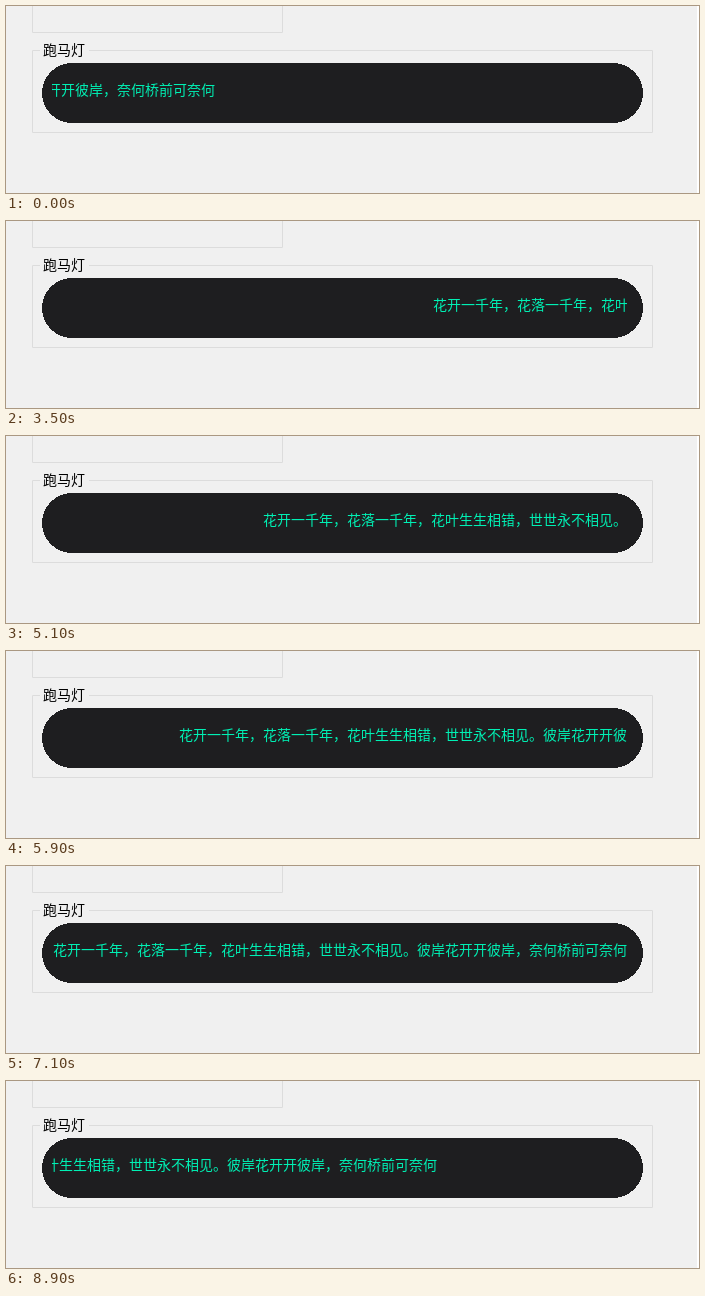
Animation of 693x187 px, one loop 9 s. Source, as an HTML page:

```html
<!DOCTYPE html>
<html lang="zh-CN">
<head>
<meta charset="utf-8">
<title>跑马灯</title>
<style>
  html, body { margin: 0; width: 100%; height: 100%; overflow: hidden; background: #f0f0f0; }
  svg { display: block; }
  text { font: 14px "Noto Sans CJK SC", "Noto Sans CJK", sans-serif; }
  .frame { fill: none; stroke: #dcdcdc; }
</style>
</head>
<body>
<svg width="693" height="187" viewBox="0 0 693 187">
  <clipPath id="view"><rect x="46" y="57" width="575" height="60"/></clipPath>
  <rect x="691" width="2" height="187" fill="#fff"/>
  <path class="frame" d="M26.5 0V26.5H276.5V0"/>
  <path class="frame" d="M34 44.5H26.5V126.5H646.5V44.5H83"/>
  <text x="37" y="49">跑马灯</text>
  <rect x="36" y="57" width="601" height="60" rx="30" fill="#1e1e20" shape-rendering="crispEdges"/>
  <g clip-path="url(#view)">
    <text id="line" y="89" fill="#00f0b4">花开一千年，花落一千年，花叶生生相错，世世永不相见。彼岸花开开彼岸，奈何桥前可奈何</text>
  </g>
</svg>
<script>
  const LOOP = 9000, STEP = 100;
  const SPEED = 0.1055;   // px per ms, to the left
  const REENTRY = 1650;   // the text comes back in from the right
  const line = document.getElementById('line');

  function leftAt(t) {
    const x = t < REENTRY ? -365 - SPEED * t : 621.3 - SPEED * (t - REENTRY);
    return 2 * Math.floor(x / 2) + 1; // 2px ticks on odd pixels
  }

  function draw() {
    const t = (performance.now() - start) % LOOP;
    line.setAttribute('x', leftAt(Math.floor(t / STEP) * STEP));
    requestAnimationFrame(draw);
  }

  const start = performance.now();
  draw();
</script>
</body>
</html>
```
